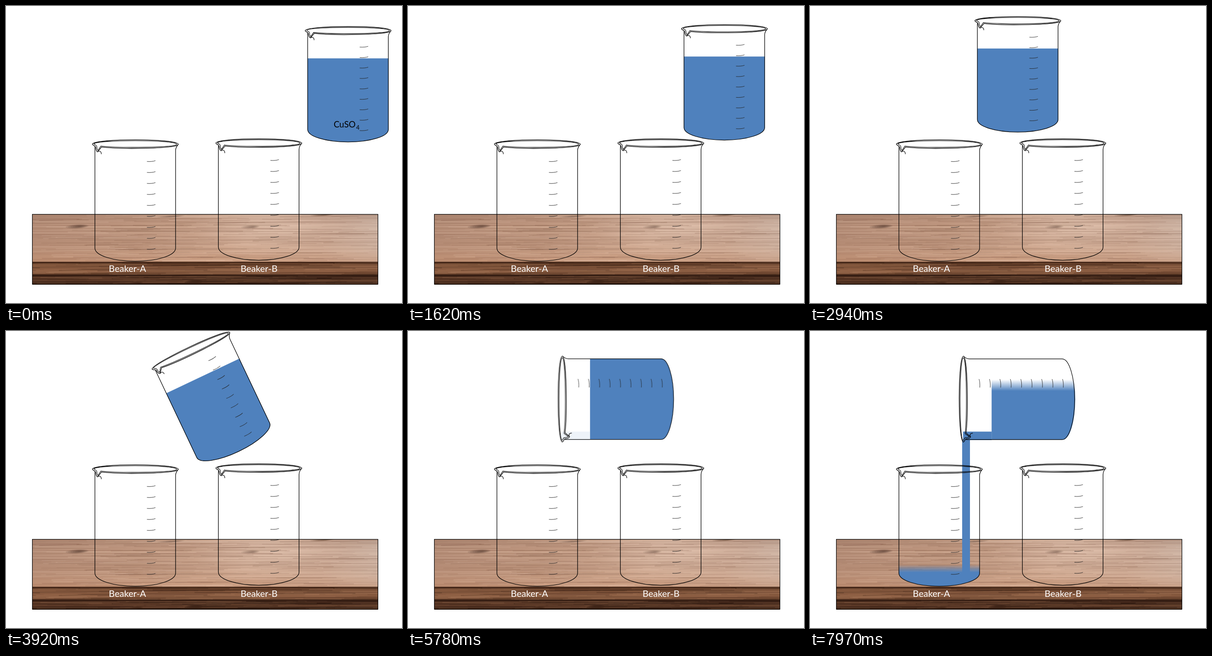
Write an HTML page with a canvas that moves like this. It is 864 px wide and 648 px high and loops after 8 s.

```html
<!DOCTYPE html>
<html lang="en">
<head>
<meta charset="utf-8">
<title>Pouring copper sulphate</title>
<style>
html, body { margin: 0; width: 100%; height: 100%; overflow: hidden; background: #fff; }
canvas { display: block; width: 100vw; height: 100vh; }
</style>
</head>
<body>
<canvas id="stage" width="864" height="648"></canvas>
<script>
const ctx = document.getElementById('stage').getContext('2d');
const LOOP = 8000, TAU = Math.PI * 2;
const BLUE = '79,129,189';
const SQUASH = 0.951;            // the pouring beaker is a little shorter
const TABLE = { x: 57.5, y: 454.5, w: 754, h: 153 };

const clamp = v => Math.min(1, Math.max(0, v));
const span = (t, start, length) => clamp((t - start) / length);
const mix = (a, b, k) => a + (b - a) * k;
const ease = k => k - Math.sin(TAU * k) / TAU;
const blue = a => `rgba(${BLUE},${a})`;

function seeded(seed) {
  return () => (seed = (seed * 16807) % 2147483647) / 2147483647;
}

// ---- table -------------------------------------------------------------

function ramp(fill, stops) {
  stops.forEach(([at, colour]) => fill.addColorStop(at, colour));
  return fill;
}

const vertical = (g, y0, y1, stops) => ramp(g.createLinearGradient(0, y0, 0, y1), stops);

function grain(g, rand, count, y0, y1, alpha, dark, light) {
  for (let i = 0; i < count; i++) {
    const x = 57 + rand() * 800 - 100, y = mix(y0, y1, rand());
    const len = 60 + rand() * 300, sway = (rand() - 0.6) * 6;
    g.strokeStyle = `rgba(${rand() < 0.5 ? dark : light},${alpha * (0.3 + rand())})`;
    g.lineWidth = 0.5 + rand() * 1.8;
    g.beginPath();
    g.moveTo(x, y);
    g.quadraticCurveTo(x + len / 2, y + sway, x + len, y + sway * 0.6);
    g.stroke();
  }
}

function knot(g, x, y, rx, ry, strength) {
  for (let i = 0; i < 6; i++) {
    const k = 1 - i / 6;
    g.fillStyle = `rgba(62,36,24,${strength * 0.14})`;
    g.beginPath();
    g.ellipse(x + i, y, rx * k, ry * k, -0.06, 0, TAU);
    g.fill();
  }
}

function makeTable() {
  const c = document.createElement('canvas');
  c.width = 864;
  c.height = 648;
  const g = c.getContext('2d'), rand = seeded(4711);
  const band = (y0, y1, draw) => {
    g.save();
    g.beginPath();
    g.rect(TABLE.x, y0, TABLE.w, y1 - y0);
    g.clip();
    draw();
    g.restore();
  };

  band(454, 559, () => {
    g.fillStyle = ramp(g.createLinearGradient(57, 0, 811, 0), [
      [0, '#b58d77'], [0.3, '#c09880'], [0.62, '#d2ad96'], [0.85, '#cdab97'], [1, '#cfb5a5']]);
    g.fillRect(57, 454, 756, 106);
    g.fillStyle = vertical(g, 454, 559, [
      [0, 'rgba(110,78,64,0.2)'], [0.25, 'rgba(110,78,64,0)'],
      [0.75, 'rgba(196,140,104,0.15)'], [1, 'rgba(196,140,104,0.45)']]);
    g.fillRect(57, 454, 756, 106);
    const glow = ramp(g.createRadialGradient(0, 0, 0, 0, 0, 1), [
      [0, 'rgba(238,212,194,0.5)'], [1, 'rgba(238,212,194,0)']]);
    g.save();
    g.translate(570, 482);
    g.scale(170, 55);
    g.fillStyle = glow;
    g.fillRect(-1, -1, 2, 2);
    g.restore();
    grain(g, rand, 400, 454, 559, 0.17, '112,74,56', '232,202,182');
    knot(g, 155, 481, 25, 4.5, 0.9);
    knot(g, 533, 482, 20, 4, 0.6);
    knot(g, 360, 459, 30, 2.5, 0.6);
    knot(g, 690, 456, 26, 2.5, 0.8);
  });
  band(558, 587, () => {
    g.fillStyle = vertical(g, 558, 587, [
      [0, '#3f2417'], [0.14, '#54321f'], [0.28, '#85583d'], [0.7, '#8a5c41'], [1, '#633e29']]);
    g.fillRect(57, 558, 756, 30);
    grain(g, rand, 140, 560, 587, 0.26, '52,29,18', '178,130,98');
  });
  band(586, 608, () => {
    g.fillStyle = vertical(g, 586, 608, [
      [0, '#2b170e'], [0.14, '#3c2216'], [0.4, '#5f3b28'], [1, '#482b1c']]);
    g.fillRect(57, 586, 756, 22);
    grain(g, rand, 120, 589, 607, 0.28, '28,14,8', '140,98,72');
    knot(g, 410, 602, 19, 5, 2.8);
    knot(g, 285, 604, 14, 3, 1.6);
  });
  g.strokeStyle = '#000';
  g.lineWidth = 1.2;
  g.strokeRect(TABLE.x, TABLE.y, TABLE.w, TABLE.h - 0.5);
  return c;
}

const table = makeTable();

// ---- beaker ------------------------------------------------------------

// Local origin: upper left corner of the rim; size 188 by 266.
function outline() {
  ctx.strokeStyle = '#000';
  ctx.lineJoin = 'round';
  ctx.lineWidth = 1.25;

  ctx.beginPath();
  ctx.moveTo(6, 16);
  ctx.lineTo(6, 237);
  ctx.ellipse(94, 237, 88, 28.7, 0, Math.PI, 0, true);
  ctx.lineTo(182, 24);
  ctx.quadraticCurveTo(182.3, 17, 187, 12);
  ctx.stroke();

  // rim with pouring lip
  ctx.lineWidth = 1.35;
  ctx.beginPath();
  ctx.moveTo(20.5, 16.5);
  ctx.bezierCurveTo(60, 21.5, 186, 20.5, 188, 10.5);
  ctx.bezierCurveTo(186, -2.6, 6, -2.4, 0.5, 10);
  ctx.bezierCurveTo(1, 14, 6, 12, 7.5, 17);
  ctx.quadraticCurveTo(8.5, 26, 12, 27);
  ctx.closePath();
  ctx.stroke();
  ctx.lineWidth = 1.15;
  ctx.beginPath();
  ctx.moveTo(19, 14.3);
  ctx.bezierCurveTo(60, 19, 183, 18, 184.5, 10.3);
  ctx.bezierCurveTo(181, 0.4, 9, 0.4, 4, 9.6);
  ctx.bezierCurveTo(5, 12, 9, 11, 10, 15);
  ctx.quadraticCurveTo(10.5, 22, 12.5, 24);
  ctx.closePath();
  ctx.stroke();
  ctx.beginPath();
  ctx.moveTo(12, 27);
  ctx.bezierCurveTo(16, 24, 20, 26, 20, 32);
  ctx.stroke();

  ctx.strokeStyle = '#222';
  ctx.lineWidth = 0.9;
  ctx.beginPath();
  for (let i = 0; i < 9; i++) {
    const y = 48 + i * 23.95;
    ctx.moveTo(119.5, y);
    ctx.quadraticCurveTo(131, y + 0.8, 138, y - 1.8);
  }
  ctx.stroke();
}

function liquidPath(top) {
  ctx.beginPath();
  ctx.moveTo(5.6, top);
  ctx.lineTo(5.6, 237);
  ctx.ellipse(94, 237, 88.4, 28.7, 0, Math.PI, 0, true);
  ctx.lineTo(182.4, top);
  ctx.closePath();
}

function place(x, y, draw) {
  ctx.save();
  ctx.translate(x, y);
  draw();
  ctx.restore();
}

function pose(cx, cy, angle) {
  ctx.translate(cx, cy);
  ctx.rotate(-angle);
  ctx.translate(-94, -126.2);
  ctx.scale(1, SQUASH);
}

function posed(cx, cy, angle, alpha, draw) {
  if (alpha <= 0) return;
  ctx.save();
  ctx.globalAlpha = alpha;
  pose(cx, cy, angle);
  draw();
  ctx.restore();
}

// Soft edge: clear at y0, solid at y1.
const softEdge = (y0, y1) => vertical(ctx, y0, y1, [[0, blue(0)], [1, blue(1)]]);

// ---- scene parts -------------------------------------------------------

const SOFT = 0.14;
const POUR = 6930;

function pouredLiquid(t) {
  if (t < POUR) return;
  const k = span(t, POUR, 3000), height = 119, base = 557;
  const lead = base - k * height * (1 + SOFT);
  place(188, 291.2, () => liquidPath(base - height - 291.2));
  ctx.fillStyle = softEdge(lead, lead + height * SOFT);
  ctx.fill();

  const top = 238, drop = 290;
  const tip = top + span(t, POUR, 750) * drop * (1 + SOFT);
  ctx.fillStyle = softEdge(tip, tip - drop * SOFT);
  ctx.fillRect(332, top, 17, drop);
}

function pouringBeaker(t) {
  const move = ease(span(t, 970, 1970));
  const angle = span(t, 3380, 1920) * Math.PI / 2;
  const swap = span(t, 5740, 440);
  const cx = mix(746.2, 453.2, move), cy = mix(170.2, 148.6, move);

  ctx.save();
  pose(cx - swap, cy + swap * 0.3, angle);
  liquidPath(73.9);
  ctx.restore();
  const drain = span(t, POUR, 3000), height = 176;
  const lead = 61 + drain * height * (1 + SOFT);
  ctx.fillStyle = drain > 0 ? softEdge(lead - height * SOFT, lead) : blue(1);
  ctx.fill();
  if (swap > 0) {
    ctx.fillStyle = blue(swap);
    ctx.fillRect(334, 219.5, 62.5, 18.5);
  }

  posed(cx, cy, angle, 1 - swap, outline);
  posed(451, 148.9, angle, swap, outline);
}

function label(text, x, y, size, colour, align) {
  ctx.font = `${size}px Lato, sans-serif`;
  ctx.fillStyle = colour;
  ctx.textAlign = align;
  ctx.fillText(text, x, y);
}

function draw(t) {
  ctx.fillStyle = '#fff';
  ctx.fillRect(0, 0, 864, 648);
  ctx.drawImage(table, 0, 0);
  pouredLiquid(t);
  place(188, 291.2, outline);
  place(457.4, 288.9, outline);
  label('Beaker-A', 265, 580, 20, '#fff', 'center');
  label('Beaker-B', 552, 580, 20, '#fff', 'center');
  pouringBeaker(t);

  const shown = 1 - span(t, 0, 490);
  if (shown > 0) {
    ctx.globalAlpha = shown;
    label('CuSO', 715, 265, 18.7, '#000', 'left');
    label('4', 764, 270, 12.6, '#000', 'left');
    ctx.globalAlpha = 1;
  }
}

const begin = performance.now();
function tick() {
  draw((performance.now() - begin) % LOOP);
  requestAnimationFrame(tick);
}
tick();
</script>
</body>
</html>
```
